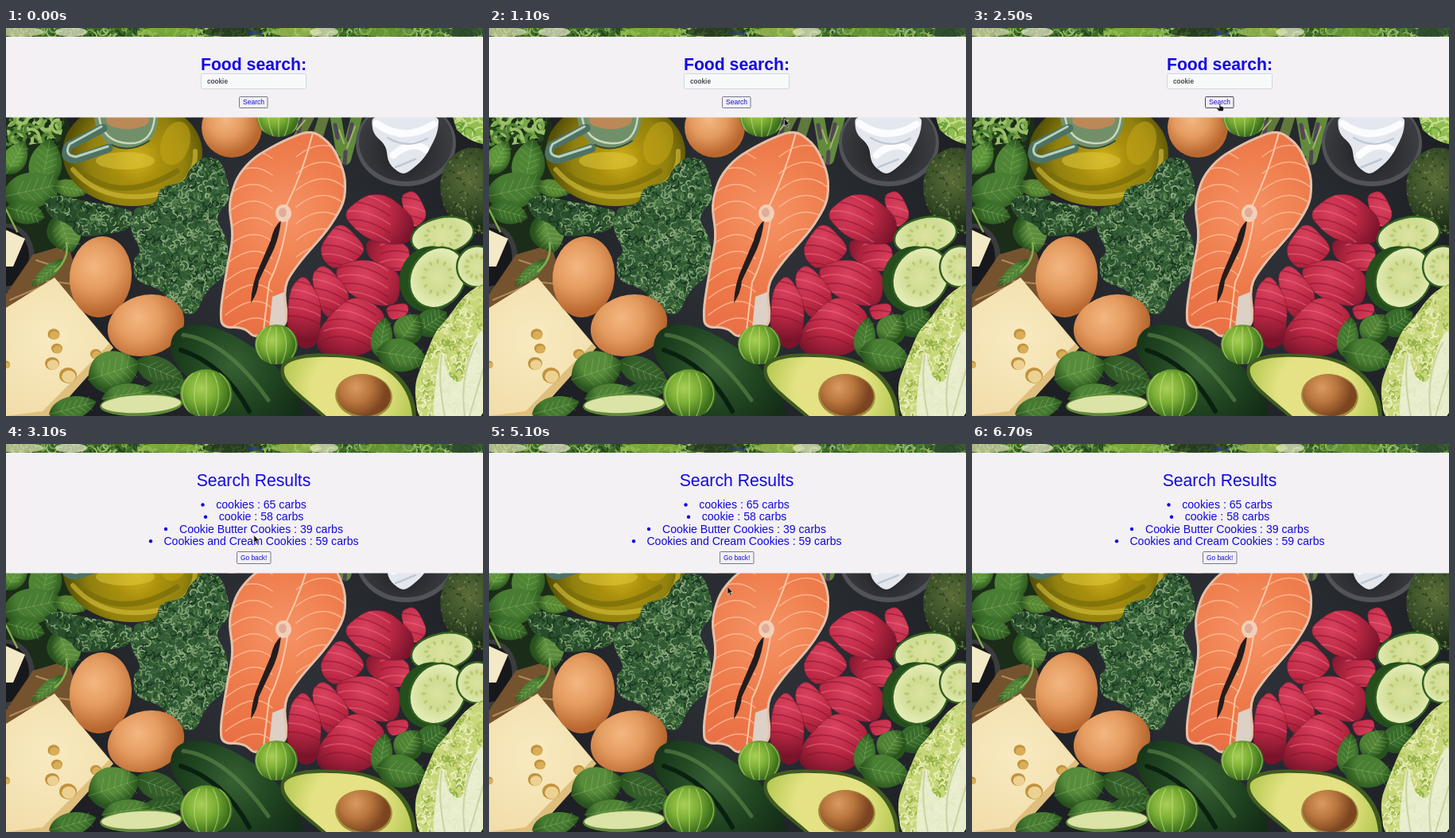
Animation of 600x488 px, one loop 7 s. Source, as an HTML page with a canvas:

```html
<!DOCTYPE html>
<html lang="en">
<head>
<meta charset="utf-8">
<title>Food search</title>
<style>
  html, body { margin: 0; width: 100%; height: 100%; overflow: hidden; background: #24272b; }
  canvas, svg { position: absolute; left: 0; top: 0; }
  text { font-family: "Liberation Sans", Arial, sans-serif; fill: #1408e0; text-anchor: middle; }
  .title { font-size: 21.2px; }
  .items { font-size: 14.1px; }
  .small { font-size: 8.5px; }
  .panel { fill: #f3f1f4; }
  .button { fill: #f1f0f3; stroke: #77778c; }
</style>
</head>
<body>
<canvas id="photo" width="600" height="488"></canvas>
<svg width="600" height="488" viewBox="0 0 600 488">
  <g id="search">
    <rect class="panel" y="11" width="600" height="101.5"/>
    <text class="title" x="311.5" y="53" font-weight="bold">Food search:</text>
    <rect x="245.5" y="57.5" width="132" height="19" rx="2" fill="#f8f9f9" stroke="#d3d5da"/>
    <text x="253" y="70" style="font-size:8.2px;font-weight:bold;fill:#484c50;text-anchor:start">cookie</text>
    <rect id="submit" class="button" x="293.5" y="86.5" width="35.500" height="14" rx="1"/>
    <text class="small" x="311.5" y="96.300">Search</text>
  </g>
  <g id="results">
    <rect class="panel" y="11" width="600" height="151.5"/>
    <text class="title" x="311.5" y="53">Search Results</text>
    <g class="items">
      <text x="321" y="81">cookies : 65 carbs</text>
      <text x="321" y="96.200">cookie : 58 carbs</text>
      <text x="321" y="111.500">Cookie Butter Cookies : 39 carbs</text>
      <text x="321" y="126.800">Cookies and Cream Cookies : 59 carbs</text>
    </g>
    <g fill="#1408e0">
      <circle cx="247.5" cy="76.500" r="2.200"/><circle cx="251" cy="91.700" r="2.200"/>
      <circle cx="201" cy="107" r="2.200"/><circle cx="182" cy="122.300" r="2.200"/>
    </g>
    <rect class="button" x="290.5" y="135.500" width="42.500" height="15" rx="1"/>
    <text x="311.700" y="146" style="font-size:8.300px">Go back!</text>
  </g>
  <g id="cursor" fill="#111" stroke="#ddd" stroke-width=".6">
    <path id="arrow" d="M0 0V9.500L2.100 7.600L3.700 11.200L5.300 10.500L3.700 7H6.700Z"/>
    <path id="hand" d="M0 .5Q1 -.6 1.700 .6V3.400L5 4.200Q6 4.700 5.600 6.500L4.800 9.500H-.6L-3.300 6Q-2.700 4.800 -1.500 5.500L0 6.300Z"/>
  </g>
</svg>
<script>
const $ = id => document.getElementById(id);
const ctx = $('photo').getContext('2d');

let seed = 7;
const random = () => (seed = seed * 16807 % 2147483647) / 2147483647;
const between = (a, b) => a + (b - a) * random();
const pick = list => list[Math.floor(random() * list.length)];

function radial(x, y, r, ...colors) {
  const g = ctx.createRadialGradient(x, y, 0, x, y, r);
  colors.forEach((c, i) => g.addColorStop(i / (colors.length - 1), c));
  return g;
}
const path = d => new Path2D(d);
function fill(p, color) { ctx.fillStyle = color; ctx.fill(p); return p; }
function line(p, color, width = 1) {
  ctx.strokeStyle = color;
  ctx.lineWidth = width;
  ctx.lineCap = ctx.lineJoin = 'round';
  ctx.stroke(p);
}
function oval(x, y, rx, ry, turn = 0) {
  const p = new Path2D();
  p.ellipse(x, y, rx, ry, turn, 0, 7);
  return p;
}
// Closed outline with rounded corners, from "x,y x,y ..."
function blob(text) {
  const pts = text.split(' ').map(s => s.split(',').map(Number));
  const mid = (a, b, k) => [a[0] + (b[0] - a[0]) * k, a[1] + (b[1] - a[1]) * k];
  const p = new Path2D();
  pts.forEach((pt, i) => {
    const prev = pts.at(i - 1), next = pts[(i + 1) % pts.length];
    p.lineTo(...mid(pt, prev, .4));
    p.quadraticCurveTo(...pt, ...mid(pt, next, .4));
  });
  p.closePath();
  return p;
}
function inside(p, draw) { ctx.save(); ctx.clip(p); draw(); ctx.restore(); }
// Short random curls over a box, kept inside an outline
function curls(p, [x, y, w, h], count, size, colors, width = 1.2) {
  inside(p, () => {
    for (let i = 0; i < count; i++) {
      const c = new Path2D(), a = between(0, 6.3);
      c.arc(x + w * random(), y + h * random(), between(.4, 1) * size, a, a + between(1.5, 4));
      line(c, pick(colors), width);
    }
  });
}
function leaf(x, y, length, width, degrees, color = '#4c8a2f', edge = '#28531d') {
  ctx.save();
  ctx.translate(x, y);
  ctx.rotate(degrees * Math.PI / 180);
  const l = length / 2, w = width * .66;
  fill(path(`M${-l} 0C${-l * .7} ${-w} ${l * .4} ${-w} ${l} 0C${l * .4} ${w} ${-l * .7} ${w} ${-l} 0`),
    radial(0, -w * .3, l, color, color, edge));
  let veins = `M${-l} 0H${l * .9}`;
  for (let i = -2; i < 3; i++) veins += `M${i * l / 4} 0l${l * .25} ${-w * .45}M${i * l / 4} 0l${l * .25} ${w * .45}`;
  line(path(veins), '#a5c77b66', .8);
  ctx.restore();
}
function sprout(x, y, r) {
  const p = fill(oval(x, y, r, r * .93), radial(x - r * .2, y - r * .2, r * 1.1, '#a9cf57', '#7caf35', '#3c701c'));
  inside(p, () => {
    for (let i = -2; i < 3; i++)
      line(path(`M${x + i * r * .2} ${y + r}Q${x + i * r * .7} ${y} ${x + i * r * .25} ${y - r * .8}`), '#d0e59288', 1.3);
  });
}
function egg(x, y, rx, ry, turn) {
  fill(oval(x, y, rx, ry, turn), radial(x - rx * .2, y - ry * .25, Math.max(rx, ry) * 1.15, '#f4b780', '#e49b60', '#b9672f'));
}
function slice(x, y, rx, ry, turn) {
  fill(oval(x, y, rx, ry, turn), '#326020');
  fill(oval(x, y, rx - 2.500, ry - 2.500, turn), radial(x, y, rx, '#dce3a0', '#cfdc92', '#e3ebb5'));
  for (let i = 0; i < 12; i++) {
    const a = i * Math.PI / 6;
    fill(oval(x + Math.cos(a) * rx * .5, y + Math.sin(a) * ry * .5, 3, 1.500, a), '#b7c970');
  }
}

const greens = ['#79a64b', '#4e8132', '#26471f', '#9abf68'];
const kaleTones = ['#75986a', '#4e7b47', '#244a29', '#17331e', '#8fae7f', '#3c6639'];

function drawTopStrip() {
  const strip = path('M0 0H600V11H0Z');
  fill(strip, '#3c672a');
  curls(strip, [0, 0, 600, 11], 260, 7, greens, 2);
  for (const [x, w, c] of [[18, 30, '#d5d8aa'], [82, 20, '#e4e5c8'], [205, 40, '#8fbd45'], [285, 38, '#20301d'],
    [365, 32, '#a8c75b'], [400, 18, '#e1e5c5'], [480, 36, '#74a73e'], [578, 25, '#2c4830']])
    fill(oval(x, 5, w, 6), c + 'bb');
  ctx.font = '8px "Liberation Sans", Arial, sans-serif';
  ctx.fillStyle = '#2b35c8';
  ctx.fillText('Home', 303, 8);
}

function drawLeftSide() {
  fill(path('M0 112H78L90 205L70 320L0 360Z'), '#1b2c18');
  curls(path('M0 112H74L68 142L0 150Z'), [0, 112, 75, 35], 60, 11, greens, 4);
  leaf(12, 163, 48, 30, -60, '#5b9439');
  leaf(50, 170, 64, 42, -80, '#4d8534');
  leaf(34, 204, 78, 46, -12, '#487d33');
  leaf(25, 232, 50, 30, 15, '#3b702b');
  leaf(82, 202, 46, 22, 10, '#568732');
  fill(oval(2, 289, 34, 43), '#3b3c3f');
  fill(oval(0, 288, 29, 37), '#17181b');
  fill(path('M0 254L24 265L9 300H0Z'), '#f4e9c6');
  fill(path('M34 285L78 272L100 345L40 350L0 362V335Z'), '#75532f');
  line(path('M38 292L62 300L50 318L85 322M5 342L45 325'), '#b18a55', 2);
  leaf(74, 258, 52, 44, 70, '#5c8d3d');
  leaf(52, 308, 52, 16, 140, '#4d8034');
  line(path('M76 270Q80 290 62 306M0 228L14 256'), '#83ad50', 2.500);
}

function drawBottle() {
  const body = fill(oval(159, 157, 88, 67), radial(165, 165, 90, '#d0b21c', '#a98f0d', '#91810f', '#575106'));
  inside(body, () => {
    line(path('M84 178Q120 219 180 211T238 155'), '#d9c13b99', 6);
    line(path('M100 185Q150 220 215 180'), '#756b08aa', 7);
    fill(oval(213, 145, 18, 28, .3), '#c7a81788');
    fill(oval(150, 167, 37, 11), '#e0c83d88');
  });
  fill(path('M111 112H191Q192 130 177 146Q153 156 128 146Q112 130 111 112Z'), '#719069');
  line(path('M117 112Q122 143 153 145T187 112'), '#cad8bd', 2.500);
  line(path('M133 147Q156 158 180 142'), '#364b2c', 2);
  fill(oval(153, 116, 27, 11), '#bb8957');
  line(path('M122 126L79 148Q69 165 88 165L129 151'), '#4d7263', 11);
  line(path('M120 124L80 146Q72 160 88 162L128 149'), '#b9d0bc', 3);
}

function drawKale() {
  const strand = fill(blob('46,218 65,209 92,216 125,222 162,230 155,254 124,260 92,263 78,246 55,238'), '#294d2b');
  curls(strand, [46, 208, 118, 56], 230, 5, kaleTones, 1.600);
  const clump = fill(blob('232,176 250,161 272,167 284,214 262,238 280,268 277,310 252,330 237,364 207,350 196,329 162,318 160,290 171,282 155,252 160,226 188,222 194,200 224,194'), '#315a35');
  curls(clump, [154, 160, 130, 204], 1150, 6, kaleTones, 1.600);
}

function drawTopRight() {
  egg(284, 125, 38, 38, 0);
  sprout(343, 111, 28);
  line(path('M383 108L364 145M401 108L392 137'), '#60793b', 13);
  line(path('M414 108L422 155M442 108L427 165'), '#628a3c', 14);
  line(path('M427 156L426 170M370 118L367 143M414 122L417 138M435 121L431 141'), '#52455a', 5);
  line(path('M376 116L366 128M419 128L425 145M439 124L429 151'), '#a1b765', 2);
  fill(oval(503, 145, 63, 54), '#515358');
  fill(oval(503, 143, 59, 50), radial(500, 155, 60, '#17191d', '#2c2e33', '#3a3c40'));
  const oil = fill(blob('460,108 545,108 543,132 530,158 520,170 500,186 481,171 478,148 461,132'), '#e4e8ee');
  inside(oil, () => {
    line(path('M466 120Q500 145 538 121M487 160Q510 140 528 153'), '#fafcff', 9);
    line(path('M480 138Q505 153 530 139M490 175L515 165'), '#bfc9d5', 2.500);
  });
  const lettuce = fill(path('M562 112H600V146Q583 143 567 128Z'), '#91bd51');
  curls(lettuce, [562, 112, 38, 34], 25, 12, ['#c5dd8b', '#689e38'], 2);
  const avocado = fill(oval(592, 205, 45, 55, -.25), radial(582, 190, 62, '#5c6d38', '#3c512a', '#1c2d17'));
  curls(avocado, [547, 150, 53, 110], 190, 1.500, ['#71804a', '#243919', '#4b6030']);
}

function drawSalmon() {
  const fish = fill(blob('385,128 411,148 427,185 426,219 405,254 370,293 349,324 355,374 331,377 314,390 299,377 271,376 270,352 278,302 286,262 280,222 290,188 311,163 350,141'), radial(350, 235, 160, '#f69466', '#ee7c4c', '#e96f44'));
  inside(fish, () => {
    for (let i = 0; i < 11; i++) {
      const y = 150 + i * 21;
      line(path(`M276 ${y + 22}Q${305 + i} ${y - 8} 335 ${y + 14}`), '#ffc09acc', 1.400);
      if (i < 8) line(path(`M365 ${y + 12}Q400 ${y - 17} 430 ${y + 12}`), '#ffc09acc', 1.400);
    }
    line(path('M386 132Q373 183 352 225M354 242Q347 288 331 320L324 380'), '#ffc8a7', 2);
    fill(path('M335 338L350 332L357 376L331 377Z'), '#ddd0c6');
  });
  line(fish, '#e5c0a9', 3);
  fill(path('M346 242Q337 249 333 267L319 300Q309 321 308 346Q317 333 318 318L337 278Q344 261 346 242Z'), '#241d1d');
  fill(oval(349, 233, 10, 11), '#f3cfb9');
  fill(oval(348, 232, 5, 6), '#dfae95');
}

function drawBeef() {
  [
    '494,211 515,203 532,237 511,255',
    '452,264 506,270 509,300 490,308 455,290',
    '476,350 505,345 507,360 484,369',
    '422,234 453,209 481,210 514,239 511,270 479,273 448,262',
    '395,274 420,241 454,276 440,294 412,304 398,291',
    '410,302 450,289 497,306 494,346 470,351 430,335',
    '382,312 400,295 433,331 428,363 400,366',
    '395,375 435,334 475,354 478,381 455,412 405,413 389,401',
    '356,329 375,308 398,345 393,397 375,405 353,386'
  ].forEach(points => {
    const [x, y] = points.split(' ')[1].split(',').map(Number);
    const chunk = fill(blob(points), radial(x, y + 22, 62, '#d9425e', '#bd2945', '#7b142b'));
    inside(chunk, () => {
      for (let i = -3; i < 5; i++) line(path(`M${x - 35} ${y + i * 11 + 14}q28 -12 65 13`), i % 2 ? '#ed738777' : '#83132c88', 1.800);
    });
    line(chunk, '#721a2f88', 1);
  });
}

function drawRightSide() {
  slice(549, 261, 41, 24, -.2);
  fill(oval(534, 316, 39, 42, .35), '#244e1b');
  slice(543, 314, 35, 41, .55);
  slice(592, 300, 26, 27, .3);
  leaf(536, 370, 45, 35, -35, '#386c2d');
  leaf(473, 389, 52, 27, -80, '#447a30');
  leaf(507, 378, 43, 38, -55, '#4f8235');
  leaf(498, 412, 65, 42, 10, '#497f32');
  const cabbage = fill(blob('610,315 578,334 553,368 540,382 526,416 513,450 520,500 610,500'), '#c8d77b');
  curls(cabbage, [512, 315, 88, 173], 520, 5, ['#eef0c3', '#b3c760', '#dbe49c', '#91b046'], 1.600);
  inside(cabbage, () => {
    fill(blob('536,500 540,445 548,400 557,440 574,448 587,394 602,375 610,500'), '#edf0d8dd');
    line(path('M548 411Q543 445 552 488M592 396Q570 437 577 488M600 430L583 488'), '#c9d4a0', 2);
  });
}

function drawLowerLeft() {
  fill(path('M0 357L61 314L135 402L58 488H0Z'), '#dfbf7d');
  fill(path('M0 352L61 314L130 397L46 482L0 488Z'), radial(55, 390, 110, '#f8eac1', '#f1dda9'));
  for (const [x, y, r] of [[60, 385, 7.500], [64, 403, 7], [58, 422, 9], [78, 437, 11], [113, 410, 7], [0, 423, 5]]) {
    fill(oval(x, y, r, r * .9), '#c3923c');
    fill(oval(x + 1, y + 1.500, r * .8, r * .7), r > 8 ? '#ecd292' : '#daae58');
  }
  egg(119, 313, 39, 51, .1);
  egg(176, 374, 49, 38, -.3);
  leaf(84, 478, 62, 30, -15, '#457a31');
  leaf(194, 432, 66, 34, 22, '#355f2b');
  leaf(200, 455, 65, 24, -12, '#2d5926');
  leaf(136, 432, 68, 54, -18, '#568c3a');
  leaf(152, 461, 64, 28, -10, '#4e8336');
}

function drawFront() {
  fill(path('M207 403C207 362 258 369 292 390C333 413 371 451 374 488H270C246 448 210 433 207 403Z'),
    radial(285, 424, 100, '#376033', '#214621', '#132d17'));
  line(path('M223 386Q277 393 330 468'), '#67905288', 5);
  line(path('M220 405Q274 423 306 482'), '#0b2110', 6);
  fill(oval(170, 474, 52, 14, -.04), '#5f8b38');
  fill(oval(170, 473, 50, 11, -.04), '#dce3a7');
  sprout(340, 398, 27);
  sprout(252, 460, 33);
  fill(path('M346 426C352 407 402 407 439 412C491 419 516 454 516 488H397C369 464 341 447 346 426Z'), '#405c20');
  fill(path('M350 427C359 412 401 412 438 416C486 423 509 455 511 488H403C375 463 346 445 350 427Z'),
    radial(430, 455, 90, '#e9df87', '#e4e384', '#afc54b'));
  fill(oval(450, 463, 36, 28, .1), '#a28d3c');
  fill(oval(450, 462, 34, 26, .1), radial(440, 452, 38, '#d99a60', '#b9763d', '#7c4520'));
}

fill(path('M0 0H600V488H0Z'), radial(330, 270, 390, '#30343a', '#23262b', '#17191d'));
[drawTopStrip, drawLeftSide, drawBottle, drawTopRight, drawKale, drawSalmon, drawBeef,
  drawRightSide, drawLowerLeft, drawFront].forEach(draw => draw());

const LOOP = 7000, RESULTS_AT = 2900;
const route = [
  [200, 604, 310], [600, 466, 153], [1000, 388, 120], [1400, 322, 96], [1700, 308, 92], [2500, 311, 95],
  [3200, 312, 118], [3900, 322.500, 156], [4500, 288, 166], [5100, 300, 179.500], [5600, 392, 208], [6300, 604, 330]
];

function frame() {
  const t = Math.floor(performance.now() % LOOP / 100) * 100;
  const found = t >= RESULTS_AT;
  $('search').style.display = found ? 'none' : '';
  $('results').style.display = found ? '' : 'none';

  const next = route.findIndex(stop => stop[0] > t);
  $('cursor').style.display = next > 0 ? '' : 'none';
  if (next > 0) {
    const [t0, x0, y0] = route[next - 1], [t1, x1, y1] = route[next];
    const k = (t - t0) / (t1 - t0);
    const x = x0 + (x1 - x0) * k, y = y0 + (y1 - y0) * k;
    const hover = !found && x > 293 && x < 329 && y > 86 && y < 101;
    $('cursor').setAttribute('transform', `translate(${x} ${y})`);
    $('arrow').style.display = hover ? 'none' : '';
    $('hand').style.display = hover ? '' : 'none';
    $('submit').style.stroke = hover ? '#4b4458' : '';
  } else {
    $('submit').style.stroke = '';
  }
  requestAnimationFrame(frame);
}
frame();
</script>
</body>
</html>
```
